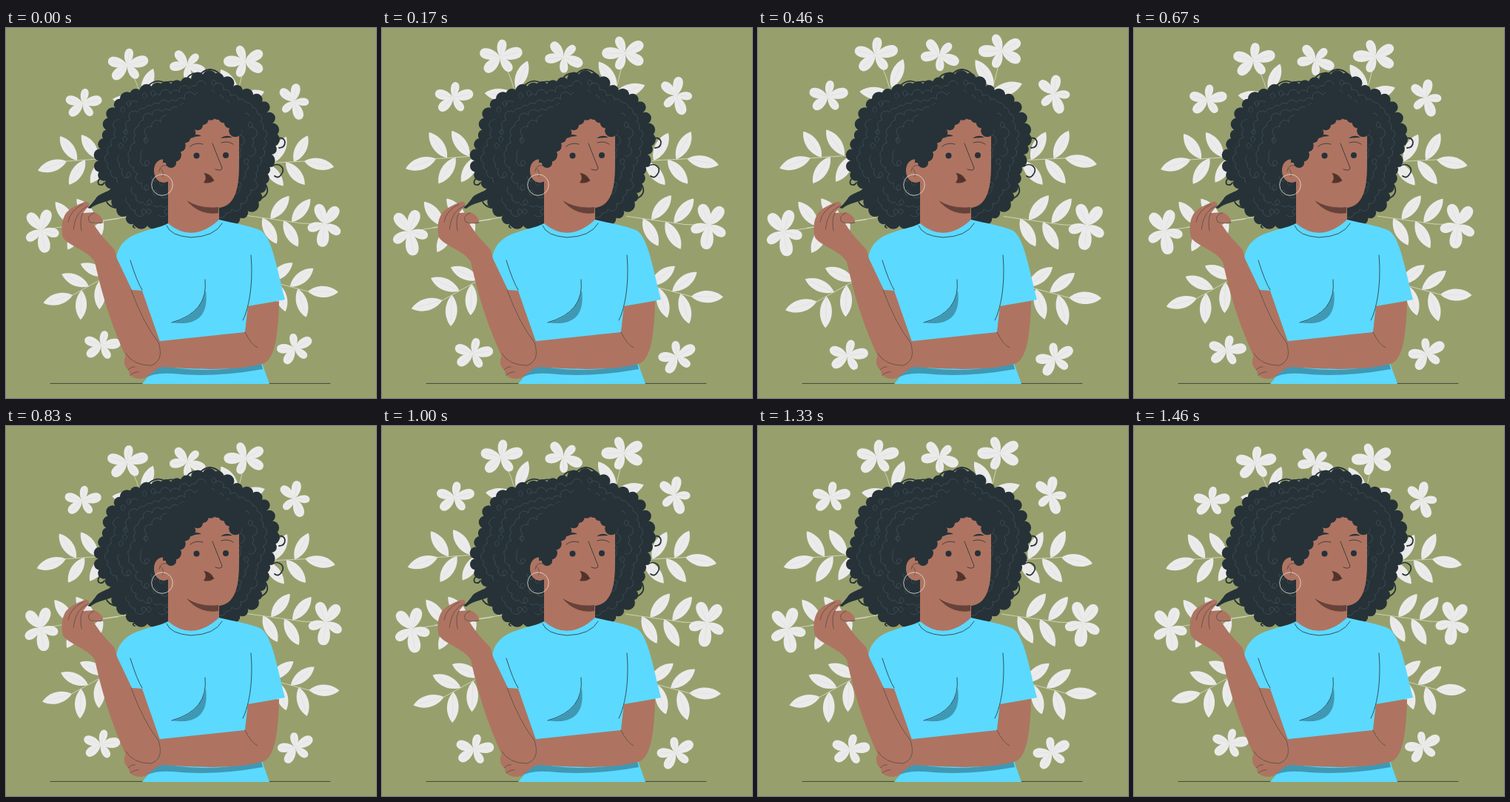
Write an HTML page that moves like this. It is 500 px wide and 500 px high and loops after 1500 ms.

```html
<!DOCTYPE html>
<html lang="en">
<head>
<meta charset="utf-8">
<title>Woman with pulsing flowers</title>
<style>
  html, body { margin: 0; height: 100%; overflow: hidden; background: #97a06c; }
  svg { display: block; width: 100vw; height: 100vh; }
  path { stroke-linecap: round; stroke-linejoin: round; }
  .dark { fill: #263238; }
  .skin { fill: #ae7461; }
  .shirt { fill: #5cd9ff; }
  .shade { fill: #4098b3; }
  .line { fill: none; stroke: #263238; stroke-width: .8; }
  .fine { fill: none; stroke: #263238; stroke-width: .5; }
  .curl { fill: none; stroke: #263238; stroke-width: 1.8; }
  .ringlet { fill: none; stroke: #50606a; stroke-width: .5; }
  .plant { fill: #ebebeb; }
  .stem { fill: none; stroke: #e2e5d6; stroke-width: .7; }
  .vein { fill: none; stroke: #d8dad3; stroke-width: .5; }
</style>
</head>
<body>
<svg viewBox="0 0 500 500">
  <path class="line" d="M60 480.4H438"/>
  <g id="plants"></g>

  <g id="hair"></g>
  <path class="curl" d="M362 151q13-6 15 3q0 8-8 8M359 187c10-7 20 3 13 11q-4 6-9 2M350 210q8 12-3 19q-8 6-15 2M242 74q5-16 22-12M263 62q12-12 26 0M192 78q12-11 24-3M210 76q14-8 28 2M134 200q-12 4-9 11q5 3 8-2M148 243q-9-2-12-8M174 270q-4-1-1-4"/>
  <path class="dark" d="M158 200C146 224 127 220 121 231Q116 238 110 243L114 244C124 235 143 235 166 222Z"/>

  <path class="skin" d="M232 150L219 185V266Q250 290 288 262V243C308 240 315 222 315 185V145Q300 112 270 122Z"/>
  <path class="skin" d="M220 182C212 172 199 180 200 194C201 206 210 212 220 207Z"/>
  <path class="fine" d="M217 186Q208 184 207 194M209 190Q214 194 212 201"/>
  <circle cx="211" cy="212" r="14.3" fill="none" stroke="#eee3d6" stroke-width=".8"/>
  <path fill="#67423a" d="M244 233Q263 245 287 242V250Q262 254 244 233Z"/>
  <g id="bangs"></g>

  <path class="dark" d="M249 149Q256 141 264 146Q256 146 249 149ZM290 149Q298 143 306 148Q298 148 290 149Z"/>
  <path class="line" d="M249 160Q256 154 266 157M291 155Q300 152 307 157M279 156L292 189Q292 194 283 191"/>
  <circle class="dark" cx="257.5" cy="172.5" r="4"/>
  <circle class="dark" cx="297" cy="172" r="4"/>
  <path fill="#57332b" d="M268 196Q277 197 281 206Q276 211 267 209Q272 203 268 196Z"/>
  <path class="line" d="M268 196Q273 205 281 206"/>

  <path class="shirt" d="M219 264Q252 292 288 259C308 264 330 267 345 274C360 285 366 325 377 367L327 376L323 411L345 450L356 481H184L205 455L208 424L183 355L170 354L149 310C152 295 160 284 180 277C195 271 208 270 219 264Z"/>
  <path class="shade" d="M186 474L205 455Q270 470 345 453L347 461Q280 473 225 467Q200 465 186 474Z"/>
  <path class="shade" d="M270 354C274 385 262 404 224 398C248 393 266 378 270 354Z"/>
  <path class="line" d="M217 267Q222 281 250 283Q282 282 292 264M331 307C334 340 330 375 320 395M269 340Q274 384 224 398M168 314Q177 343 184 354"/>

  <path class="skin" d="M327 376L369 369C368 415 363 452 345 454C310 464 250 461 212 458C200 460 194 472 184 474C170 475 165 467 166 463C160 458 157 450 163 440L200 424L323 411Z"/>
  <path class="fine" d="M323 411Q331 428 340 432M165 462Q170 457 174 458M168 469Q174 464 179 465"/>
  <path class="skin" d="M120 316C110 300 85 295 77 283C73 268 77 254 83 248C92 240 100 238 106 235Q114 234 112 240L104 250L119 249Q128 252 131 260Q132 265 124 264L117 263Q128 280 135 287L147 300L150 312L170 354L184 355L208 424C212 442 209 455 196 456C180 457 167 452 160 440C145 405 133 375 120 316Z"/>
  <path class="fine" d="M112 240Q94 246 91 272M104 250Q99 258 102 274M119 250Q108 254 113 262Q119 265 131 263M104 238Q86 247 84 262M169 354Q186 400 206 425Q214 450 196 456Q172 456 162 440"/>
</svg>

<script>
const LOOP = 1500, FRAMES = 36;
const plants = document.getElementById('plants');
const hair = document.getElementById('hair');
const bangs = document.getElementById('bangs');

let seed = 7;
const random = () => (seed = seed * 16807 % 2147483647) / 2147483647;

function make(tag, attrs) {
  const el = document.createElementNS('http://www.w3.org/2000/svg', tag);
  for (const key in attrs) el.setAttribute(key, attrs[key]);
  return el;
}
const addPath = (parent, cls, d) => parent.appendChild(make('path', { class: cls, d }));
const addDot = (parent, cls, cx, cy, r) => parent.appendChild(make('circle', { class: cls, cx, cy, r }));

// Point at a distance and an angle in degrees
function polar(x, y, angle, length) {
  const a = angle * Math.PI / 180;
  return [x + length * Math.cos(a), y + length * Math.sin(a)];
}

// Symmetric blade from base to tip; near and far place its widest part
function blade([x0, y0], [x1, y1], width = .25, near = .28, far = .72) {
  const dx = x1 - x0, dy = y1 - y0;
  const at = (k, w) => `${x0 + dx * k - dy * w} ${y0 + dy * k + dx * w} `;
  addPath(plants, 'plant', `M${at(0, 0)}C${at(near, width)}${at(far, width)}${at(1, 0)}C${at(far, -width)}${at(near, -width)}${at(0, 0)}Z`);
  addPath(plants, 'vein', `M${at(0, 0)}L${at(.8, 0)}`);
}

// Five petals, foreshortened across the tilt
function flower(x, y, radius, tilt) {
  for (let i = 0; i < 5; i++) {
    const [px, py] = polar(0, 0, i * 72, radius);
    const length = Math.hypot(px, py * .75);
    const angle = Math.atan2(py * .75, px) * 180 / Math.PI;
    blade([x, y], polar(x, y, tilt + angle, length), .35, .35, 1);
  }
  addDot(plants, 'plant', x, y, 1.5);
}

// Stem running back from its end, with two leaves on either side
function sprig(x, y, angle, side, hasTip = true) {
  const back = angle + 180 + 14 * side;
  const [ex, ey] = polar(x, y, back, 75);
  addPath(plants, 'stem', `M${x} ${y}L${ex} ${ey}`);
  if (hasTip) blade([x, y], polar(x, y, angle, 41));
  for (const [offset, turn] of [[14, 73], [25, -39]])
    for (const along of [offset, offset + 29]) {
      const base = polar(x, y, back, along);
      blade(base, polar(...base, angle + turn * side, 40));
    }
}

sprig(82, 180, 162, 1);
sprig(403, 180, 11, -1);
sprig(90, 361, 165, -1);
sprig(408, 356, 1, 1);
sprig(400, 264, 22, -1, false);
sprig(78, 268, 158, 1, false);
addPath(plants, 'stem', 'M431 265L400 264M48 273L165 255M164 50Q180 75 186 110M323 45Q316 80 306 110');
blade([184, 91], [199, 55]);
blade([186, 101], [144, 96]);
blade([313, 90], [290, 56]);
blade([308, 100], [349, 86]);

flower(164, 50, 29, -15);
flower(245, 50, 26, 22);
flower(323, 45, 29, 180);
flower(104, 102, 26, -13);
flower(389, 99, 26, 70);
flower(48, 273, 31, 80);
flower(431, 265, 31, 98);
flower(129, 429, 26, -8);
flower(390, 433, 26, -30);

// Points along a curve at slightly uneven steps
function sample(d, step) {
  const path = make('path', { d }), points = [];
  for (let s = 0; s < path.getTotalLength(); s += step * (.8 + .4 * random())) {
    const { x, y } = path.getPointAtLength(s);
    points.push([x, y]);
  }
  return points;
}

const hairEdge = 'M180 262C150 252 152 225 138 204C120 190 124 165 138 150C136 120 150 100 172 92C200 78 230 84 250 72C275 60 300 70 315 88C340 92 352 105 358 130C364 150 358 170 350 190C346 215 340 235 322 248L300 262Z';
const fringe = 'M223 182C231 170 231 158 246 144C262 128 268 121 281 113C296 118 304 128 310 139';

addPath(hair, 'dark', hairEdge);
for (const [x, y] of sample(hairEdge, 14)) addDot(hair, 'dark', x, y, 7 + 3 * random());

// Broken chains of curls nested inside the outline
for (const k of [.9, .77, .64, .5]) {
  let d = '', prev;
  for (const [px, py] of sample(hairEdge, 12 / k)) {
    const x = 240 + (px - 240) * k, y = 165 + (py - 165) * k;
    d += prev && random() < .8 ? `A7 7 0 0 1 ${x} ${y}` : `M${x} ${y}q-6-5 0-8q6 3 1 7`;
    if (!d.endsWith('7')) prev = true;
    prev = true;
  }
  addPath(hair, 'ringlet', d);
}

addPath(bangs, 'dark', fringe + 'L330 120L270 80L215 120L212 182Z');
for (const [x, y] of sample(fringe, 12)) addDot(bangs, 'dark', x, y, 6.5 + 2.5 * random());

// Two beats, the first one fading more slowly; p runs from 0 to 1
function pulse(p) {
  if (p < .2) return 1 + p / 2;
  if (p < .6) return 1.1 - (p - .2) / 4;
  if (p < .8) return 1 + (p - .6) / 2;
  return 1.1 - (p - .8) / 2;
}

function draw(now) {
  const step = Math.floor((now % LOOP) / LOOP * FRAMES + .12) % FRAMES;
  const scale = pulse(step / (FRAMES - 1));
  plants.setAttribute('transform', `translate(238 238) scale(${scale}) translate(-238 -238)`);
  requestAnimationFrame(draw);
}
draw(performance.now());
</script>
</body>
</html>
```
